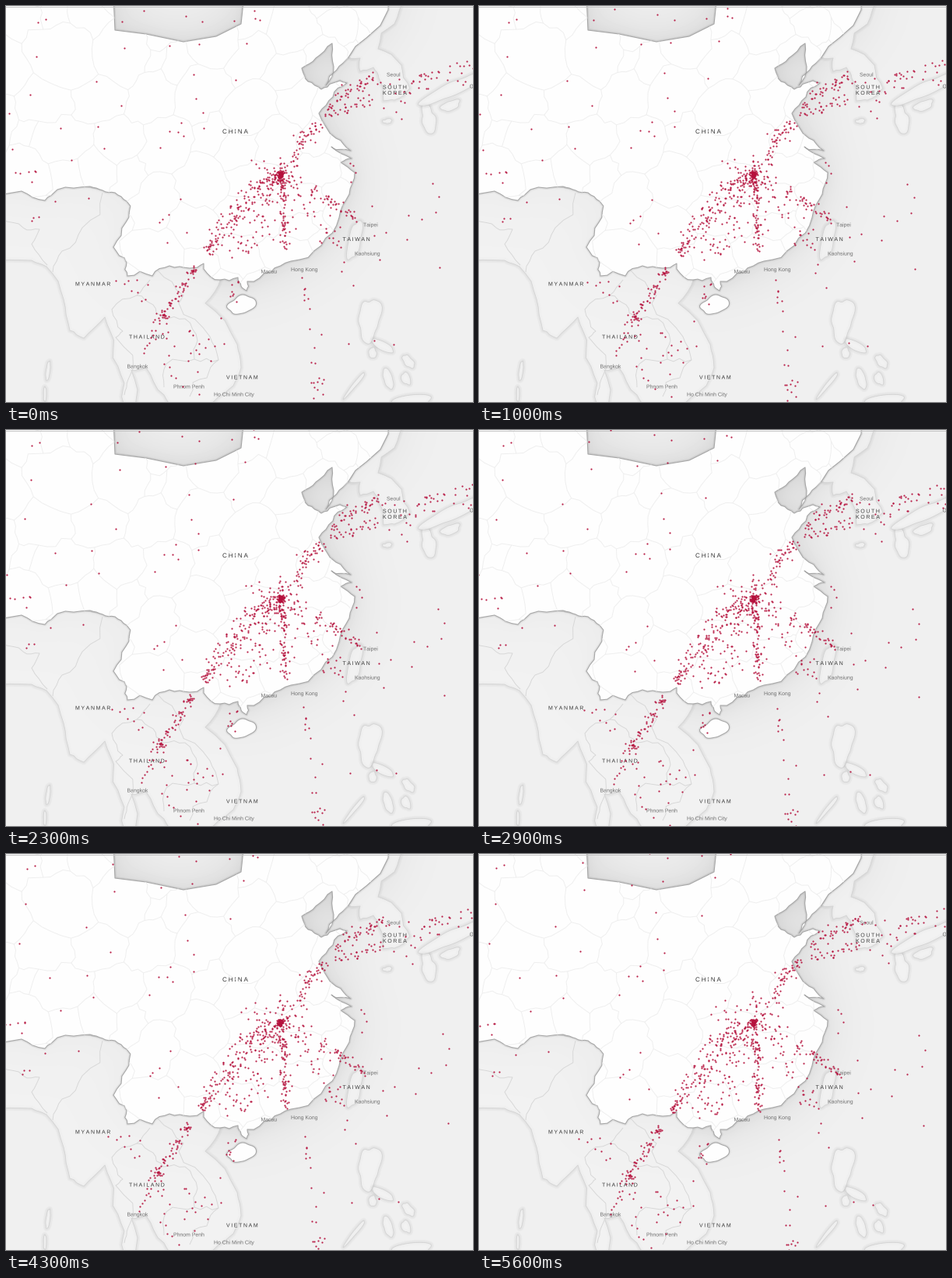
Animation, 600 px wide and 509 px high, one loop 5.7 s. Source, as a matplotlib script:

```python
import numpy as np
import matplotlib.pyplot as plt
from matplotlib.animation import FuncAnimation
from matplotlib.collections import LineCollection
from matplotlib.patches import PathPatch, Polygon
from matplotlib.path import Path
from matplotlib.textpath import TextPath
from matplotlib.tri import Triangulation

W, H, DPI = 600, 509, 100
FRAMES, INTERVAL = 57, 100
PX = 72 / DPI
HUB = np.array([353, 217])
SPEED = 0.335                      # pixels per tick
DRIFT = SPEED * (FRAMES - 2)       # travel over one loop
RED = "#b5103c"
rng = np.random.default_rng(11)


def pts(*v):
    return np.array(v, float).reshape(-1, 2)


def rough(p, amount=0.09, levels=2):
    """Crinkle a polyline by fractal midpoint displacement."""
    for _ in range(levels):
        d = np.diff(p, axis=0)
        normal = np.column_stack([-d[:, 1], d[:, 0]])
        mid = p[:-1] + d / 2 + normal * rng.normal(0, amount, (len(d), 1))
        p = np.insert(p, np.arange(1, len(p)), mid, axis=0)
    return p


def blob(x, y, rx, ry, tilt):
    """Island: a tilted ellipse with a wobbly rim."""
    a = np.linspace(0, 2 * np.pi, 49)
    r = 1 + sum(rng.normal(0, 0.2 / k) * np.cos(k * a + rng.uniform(0, 6)) for k in range(2, 8))
    c, s = np.cos(np.radians(tilt)), np.sin(np.radians(tilt))
    u, v = rx * r * np.cos(a), ry * r * np.sin(a)
    return np.column_stack([x + u * c - v * s, y + u * s + v * c])


# ---------- geography: key points only ----------
north = pts(-80, -80, 135, -80, 140, 31, 180, 36, 228, 46, 270, 39, 302, 23, 313, -80,
            493, -80, 491, 5, 481, 25, 463, 41, 449, 52, 440, 66)
coast = pts(440, 66, 425, 82, 411, 102, 421, 78, 419, 48, 398, 67, 380, 80, 388, 97,
            405, 107, 420, 99, 438, 99, 420, 117, 402, 138, 424, 170, 443, 186, 418, 181,
            444, 196, 430, 201, 448, 214, 441, 242, 428, 272, 405, 308, 366, 328, 340, 342,
            310, 354, 309, 366, 302, 360, 298, 349, 275, 352, 254, 338)
frontier = pts(254, 331, 236, 337, 210, 334, 188, 347, 156, 347, 155, 330, 138, 310,
               154, 278, 155, 251, 140, 240, 124, 237, 108, 232, 66, 236, 50, 250,
               20, 238, -80, 225)
china = np.vstack([north, rough(coast), rough(frontier)])
hainan = blob(303, 384, 17, 12, -20)

indochina = pts(-80, 200, -80, 327, 33, 327, 52, 335, 74, 377, 82, 417, 100, 427, 127, 400,
                138, 440, 152, 485, 150, 520, 166, 520, 161, 468, 180, 465, 203, 500,
                220, 520, 255, 520, 292, 488, 302, 465, 297, 435, 256, 382, 276, 350, 200, 250)
korea = pts(440, 66, 449, 52, 463, 41, 481, 25, 493, -9, 513, -9, 499, 23, 478, 55,
            508, 76, 519, 106, 499, 121, 485, 122, 479, 93, 472, 79, 455, 84, 455, 67, 440, 66)
islands = [blob(*b) for b in [
    (448, 301, 8, 26, 12), (467, 403, 14, 27, 5), (484, 437, 17, 5, 28), (471, 446, 5, 7, 0),
    (517, 457, 5, 11, -40), (491, 479, 6, 13, -20), (514, 479, 5, 9, -25), (448, 487, 21, 2.5, -50),
    (520, 510, 28, 10, -8), (543, 146, 9, 18, -8), (571, 128, 13, 6, -18), (575, 106, 44, 9, -28),
    (490, 148, 6, 3, 0), (54, 469, 2.5, 13, 8), (50, 499, 2, 9, 5)]]
borders = [
    pts(124, 240, 98, 285, 72, 315, 60, 342),
    pts(-5, 275, 22, 285, 43, 287, 33, 306, 53, 333),
    pts(185, 352, 168, 372, 136, 390, 150, 418, 141, 426, 157, 480, 152, 500),
    pts(195, 340, 228, 372, 222, 382, 262, 425, 273, 455, 258, 478, 236, 502),
    pts(168, 372, 189, 384, 202, 402, 230, 402, 246, 430, 242, 454, 206, 460, 203, 490),
    pts(242, 454, 273, 455),
]


def provinces():
    """Edges between the cells of a jittered grid, wider in the west."""
    u, v = np.meshgrid(np.linspace(0, 1, 11), np.linspace(-30, 380, 9))
    sites = np.column_stack([(470 - 540 * u ** 1.3).ravel(), v.ravel()])
    sites += rng.normal(0, 13, sites.shape)
    tri = Triangulation(*sites.T)
    mid = sites[tri.triangles].mean(axis=1)
    return [rough(mid[[i, j]], 0.12) for i, near in enumerate(tri.neighbors) for j in near if j > i]


# ---------- travellers ----------
# Route: dot count, sideways spread, first distance, way points
ROUTES = [
    (76, 2.0, -DRIFT, pts(353, 217, 357, 270, 360, 334)),
    (125, 5.5, -DRIFT, pts(353, 217, 320, 240, 290, 270, 246, 332)),
    (80, 2.6, 0, pts(246, 332, 222, 368, 198, 405, 169, 464)),
    (48, 15, 20, pts(353, 217, 315, 270, 280, 345)),
    (24, 13, 20, pts(353, 217, 332, 260, 305, 335)),
    (28, 10, -DRIFT, pts(353, 217, 325, 228, 285, 245)),
    (62, 5, -DRIFT, pts(353, 217, 385, 172, 412, 135)),
    (44, 4, 0, pts(412, 135, 440, 107, 490, 82)),
    (30, 4, 0, pts(408, 142, 440, 130, 490, 118)),
    (26, 3, 0, pts(516, 97, 560, 84, 625, 70)),
    (11, 3, 0, pts(516, 112, 560, 104, 625, 93)),
    (58, 5, -DRIFT, pts(353, 217, 385, 232, 436, 262, 470, 288)),
    (24, 13, 25, pts(353, 217, 400, 270, 418, 325)),
    (9, 2, 0, pts(419, 284, 430, 322, 447, 380)),
    (7, 1.5, 0, pts(378, 340, 386, 368, 392, 412)),
    (13, 5, 0, pts(392, 425, 397, 465, 402, 525)),
    (9, 4, 0, pts(298, 350, 286, 390, 281, 440)),
]
# Scattered flights: dot count and the box they start in
FIELDS = [
    (34, 0, 330, 0, 200), (6, 190, 250, 235, 310), (6, 10, 45, 208, 226), (5, 30, 130, 235, 295),
    (15, 440, 590, 200, 340), (24, 203, 282, 405, 500), (9, 135, 182, 345, 395),
    (11, 472, 512, 90, 150), (5, 360, 505, 410, 440),
]


def make_route(count, spread, first, p):
    seg = np.diff(p, axis=0)
    length = np.hypot(*seg.T)
    arc = np.concatenate([[0], np.cumsum(length)])
    normal = np.column_stack([-seg[:, 1], seg[:, 0]]) / length[:, None]
    start = rng.uniform(first, arc[-1] - DRIFT, count)
    side = rng.normal(0, 1, count)

    def at(t):
        s = np.clip(start + SPEED * t, 0, arc[-1])
        wide = side * (1.2 + spread * np.sqrt(np.abs(np.sin(np.pi * s / arc[-1]))))
        mid = (arc[:-1] + arc[1:]) / 2
        return np.column_stack([
            np.interp(s, arc, p[:, k]) + wide * np.interp(s, mid, normal[:, k]) for k in (0, 1)])
    return at


routes = [make_route(*r) for r in ROUTES]
core = HUB + rng.normal(0, 2.6, (50, 2))
halo = HUB + rng.normal(0, 11, (60, 2))
fields = [rng.uniform([x0, y0], [x1, y1], (n, 2)) for n, x0, x1, y0, y1 in FIELDS]
free = np.vstack(fields + [halo])
dist = np.hypot(*(free - HUB).T)[:, None]
head = (free - HUB) / dist
head[:, 1] += 0.0011 * dist[:, 0]      # great-circle bend
head /= np.hypot(*head.T)[:, None]


def dots_at(t):
    return np.vstack([core, free + head * SPEED * t] + [r(t) for r in routes])


# ---------- drawing ----------
fig = plt.figure(figsize=(W / DPI, H / DPI), dpi=DPI, facecolor="#efefef")
ax = fig.add_axes([0, 0, 1, 1])
ax.axis("off")


def blur(m, sigma):
    x = np.arange(-3 * sigma, 3 * sigma + 1)
    k = np.exp(-x * x / (2 * sigma ** 2))
    for axis in (0, 1):
        m = np.apply_along_axis(np.convolve, axis, m, k / k.sum(), "same")
    return m


def shadow(step=3, margin=78):
    xs, ys = np.arange(-margin, W + margin, step), np.arange(-margin, H + margin, step)
    gx, gy = np.meshgrid(xs, ys)
    m = Path(china).contains_points(np.column_stack([gx.ravel(), gy.ravel()]))
    m = m.reshape(gx.shape).astype(float)
    tone = 0.94 - 0.095 * blur(m, 12) - 0.045 * blur(m, 3)
    ax.imshow(tone, cmap="gray", vmin=0, vmax=1, interpolation="bilinear", aspect="auto",
              extent=(xs[0] - step / 2, xs[-1] + step / 2, ys[-1] + step / 2, ys[0] - step / 2))


def land(p, face, edge, width, alpha=1.0):
    patch = ax.add_patch(Polygon(p, fc=face, ec="none", alpha=alpha))
    ax.add_patch(Polygon(p, fc="none", ec=edge, lw=width * PX, joinstyle="round"))
    return patch


def glow(p, widths, alpha):
    for w in widths:
        ax.add_patch(Polygon(p, fc="none", ec="black", lw=w * PX, alpha=alpha, joinstyle="round"))


def label(text, x, y, size=6.9, color="#707070", track=0.0):
    def glyphs(s):
        return TextPath((0, 0), s, size=size, prop={"family": "Liberation Sans"})

    bar = glyphs("||").get_extents().x1
    for c in text:
        if c != " ":
            g = glyphs(c)
            outline = Path(g.vertices * [1, -1] + [x, y + 0.36 * size], g.codes)
            ax.add_patch(PathPatch(outline, fc=color, lw=0, snap=False))
        x += glyphs("|" + c + "|").get_extents().x1 - bar + track


shadow()
for p in [rough(indochina, 0.06), rough(korea, 0.06)] + islands:
    glow(p, (7, 4), 0.022)
    land(p, "#f3f3f3", "#d2d2d2", 0.8, 0.75)
ax.add_collection(LineCollection([rough(b) for b in borders], colors="#d6d6d6", linewidths=0.9 * PX))
for p in (hainan, china):
    glow(p, (4,), 0.06)
    mainland = land(p, "#fefefe", "#a6a6a6", 1.1)
inner = ax.add_collection(LineCollection(provinces(), colors="#eeeeee", linewidths=0.9 * PX))
inner.set_clip_path(mainland)
for y in (0.5, H - 0.5):
    ax.plot([0, W], [y, y], color="#c4c4c4", lw=PX)

label("CHINA", 278, 161, 8, "#333333", 2.0)
for name, x, y in [("MYANMAR", 89, 357), ("THAILAND", 158, 425), ("VIETNAM", 283, 477),
                   ("TAIWAN", 432.5, 299.5), ("SOUTH", 484, 104), ("KOREA", 484, 111.5)]:
    label(name, x, y, 7, "#3c3c3c", 1.6)
for name, x, y in [("Seoul", 489, 88), ("Taipei", 459, 281), ("Kaohsiung", 448, 318),
                   ("Hong Kong", 366, 338.5), ("Macau", 327.5, 341), ("Bangkok", 155.5, 463),
                   ("Phnom Penh", 215, 489), ("Ho Chi Minh City", 267, 499), ("Osaka", 595.5, 103)]:
    label(name, x, y)

dots = ax.scatter(*dots_at(0).T, s=2.5, c=RED, linewidths=0, alpha=0.92, zorder=5)
ax.set_xlim(0, W)
ax.set_ylim(H, 0)


def draw(n):
    # the second tick is held once before the steady drift
    dots.set_offsets(dots_at(n if n < 2 else n - 1))
    return dots,


anim = FuncAnimation(fig, draw, frames=FRAMES, init_func=lambda: draw(0),
                     interval=INTERVAL, repeat=True, repeat_delay=0, blit=False)
plt.show()
```
